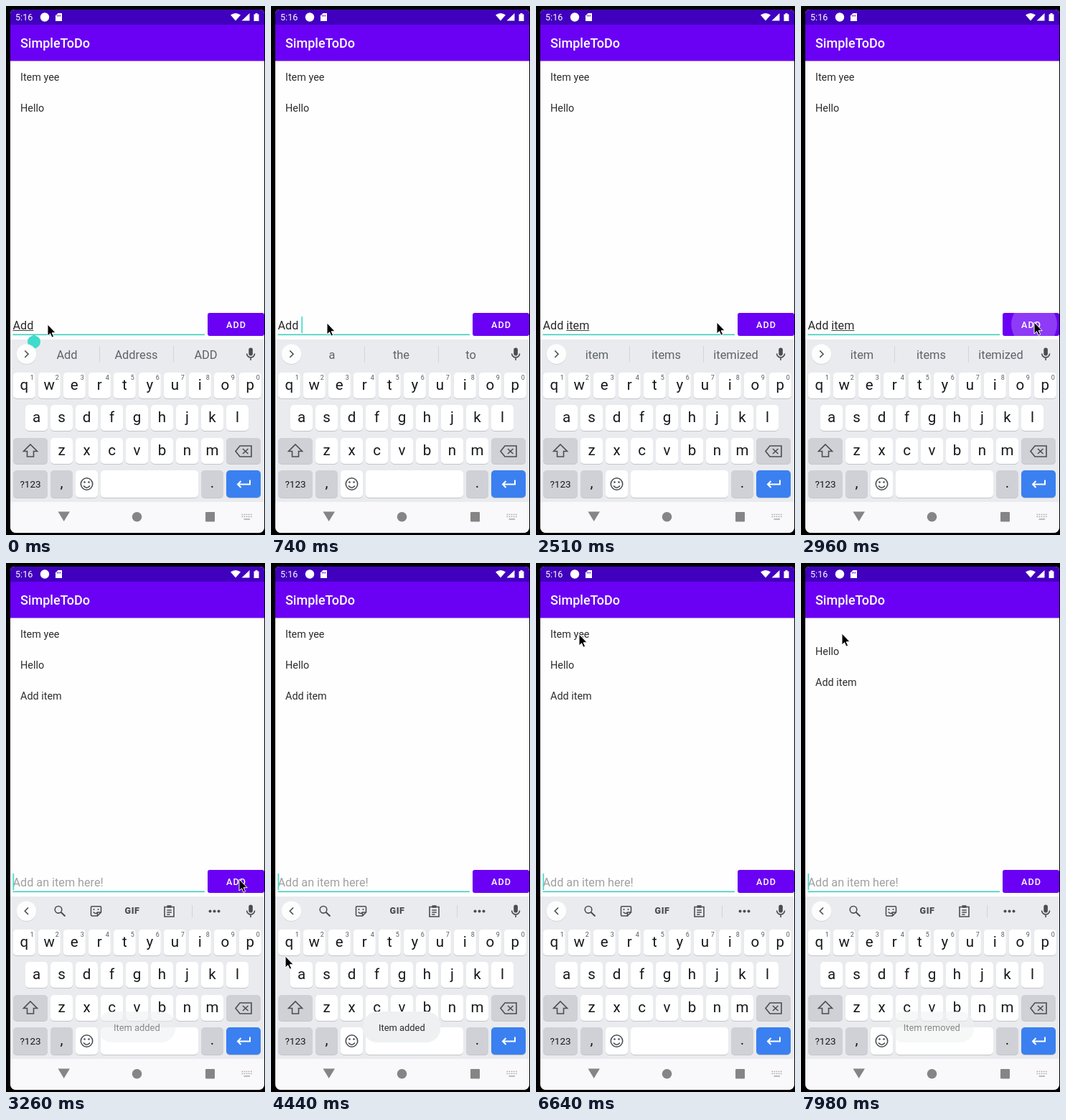
These frames come from a looping animation (361 px wide and 736 px high, 8 s). An HTML page:

```html
<!DOCTYPE html>
<html lang="en">
<head>
<meta charset="utf-8">
<title>To-do list</title>
<style>
  html, body { margin: 0; width: 100%; height: 100%; overflow: hidden; background: #000; }
  svg { display: block; font-family: Roboto, sans-serif; }
  text { white-space: pre; }
  .mid { text-anchor: middle; }
  .line { fill: none; stroke: #4a4d51; stroke-width: 1.6; }
  .item { font-size: 14.4px; fill: #2c2c2c; }
  .input { font-size: 16.2px; }
  .word { font-size: 16.4px; fill: #5f6368; }
</style>
</head>
<body>
<svg width="361" height="736" viewBox="0 0 361 736">
  <defs>
    <clipPath id="screen"><path d="M6 11q0-6 6-6H354q6 0 6 6V724q0 9-9 9H15q-9 0-9-9Z"/></clipPath>
    <clipPath id="button"><rect x="281" y="427" width="79" height="32" rx="3"/></clipPath>
  </defs>
  <g clip-path="url(#screen)">
    <rect width="361" height="736" fill="#fefefe"/>
    <rect width="361" height="26" fill="#4000bd"/>
    <rect y="26" width="361" height="50.5" fill="#6a00f4"/>
    <rect y="464" width="361" height="226" fill="#e9ebee"/>
    <rect y="690" width="361" height="46" fill="#f9f9fb"/>

    <g fill="#fff">
      <text x="13" y="20" font-size="12.6">5:16</text>
      <circle cx="54" cy="15.5" r="6.2"/>
      <path d="M72.5 10H78V21H69V13.5Z"/>
      <path d="M313 12.5Q320 7.5 327 12.5L320 20.5Z"/>
      <path d="M339.5 10V20.5H328.5Z"/>
      <path d="M345.5 11.5H347.5V10H350.5V11.5H352.5V21H345.5Z"/>
      <text x="20" y="58" font-size="18" font-weight="500">SimpleToDo</text>
    </g>
    <path d="M71.5 12.5V14.5M73.5 12.5V14.5M75.5 12.5V14.5" stroke="#4000bd"/>

    <text id="first" class="item" x="20" y="103.7">Item yee</text>
    <g id="rest">
      <text class="item" x="20" y="147">Hello</text>
      <text id="added" class="item" x="20" y="190.3">Add item</text>
    </g>

    <text id="input" class="input" x="9.5" y="450"></text>
    <rect id="composing" y="451" height="1" fill="#444"/>
    <rect x="9.5" y="456.5" width="267.5" height="1.6" fill="#3ecfbd"/>
    <rect id="caret" y="432" width="1.7" height="23" fill="#45dcc8"/>
    <path id="handle" d="M39 457.5L45.2 460.7A9 9 0 1 1 32.8 460.7Z" fill="#40dccb"/>

    <g clip-path="url(#button)">
      <rect x="281" y="427" width="79" height="32" fill="#6a00f4"/>
      <circle id="ripple" cx="325" cy="443" fill="#fff" opacity=".23"/>
    </g>
    <text class="mid" x="321" y="448" font-size="12.6" font-weight="500" letter-spacing="1.13" fill="#fff">ADD</text>

    <circle cx="28.5" cy="485" r="14" fill="#d4d6d9"/>
    <circle cx="28.5" cy="484.3" r="13.8" fill="#fdfdfd"/>
    <path id="chevron" class="line"/>
    <g id="words">
      <text class="word mid" x="85" y="490.5"></text>
      <text class="word mid" x="181.5" y="490.5"></text>
      <text class="word mid" x="278.5" y="490.5"></text>
      <path d="M130.5 473V496M233.5 473V496" stroke="#d2d4d8"/>
    </g>
    <g id="tools">
      <g class="line">
        <circle cx="73" cy="482.3" r="4.8"/><path d="M76.5 485.8L82.5 491.5" stroke-width="2"/>
        <path d="M120 477.8H131Q132.5 477.8 132.5 479.3V486L127.5 491H120Q118.5 491 118.5 489.5V479.3Q118.5 477.8 120 477.8ZM132.5 486H127.5V491M121.8 485.5Q124.5 489 127 486.5"/>
        <path d="M122.5 481V483M128.5 481V483"/>
        <path d="M221 478.5H234V492H221ZM224.3 483H230.8M224.3 486H230.8M224.3 489H228.5"/>
        <path d="M224.5 478H230.5" stroke-width="3.5"/>
      </g>
      <text class="mid" x="176" y="488.3" font-size="12.5" font-weight="900" letter-spacing=".6" fill="#4a4d51">GIF</text>
      <path d="M259.5 476V493" stroke="#d2d4d8"/>
      <g fill="#4a4d51"><circle cx="284.5" cy="484.5" r="2"/><circle cx="290.5" cy="484.5" r="2"/><circle cx="296.5" cy="484.5" r="2"/></g>
    </g>
    <rect x="338.3" y="475.5" width="5.6" height="11" rx="2.8" fill="#4a4d51"/>
    <path class="line" d="M335.6 483.5A5.5 5.5 0 0 0 346.6 483.5M341.1 489V493"/>

    <g id="keys"></g>
    <g class="line">
      <path d="M34 610L43.5 619.5H38.5V627H29.5V619.5H24.5Z"/>
      <path d="M320 619.5L326 612H342V627H326ZM330 616L337.5 623M337.5 616L330 623"/>
      <circle cx="112.5" cy="665" r="8.2"/><path d="M108 667.5Q112.5 673 117 667.5"/>
      <path d="M340 659.5V665.5H323M327.5 661L323 665.5L327.5 670" stroke="#fff" stroke-width="2"/>
    </g>
    <circle cx="109.5" cy="662.5" r="1.3" fill="#4a4d51"/><circle cx="115.5" cy="662.5" r="1.3" fill="#4a4d51"/>

    <g fill="#858585">
      <path d="M72.5 703.5H89L80.7 717Z"/>
      <circle cx="182.5" cy="710.8" r="6.8"/>
      <rect x="278" y="704" width="13" height="13.5" rx="1"/>
    </g>
    <path d="M328.5 707.5H343M328.5 710.5H343" stroke="#aaa" stroke-width="1.6" stroke-dasharray="1.7 1.4"/>
    <path d="M331.5 714H340" stroke="#aaa" stroke-width="1.6"/>

    <g id="toast">
      <rect y="624" height="43" rx="20" fill="#eef0f1"/>
      <text class="mid" x="182.3" y="650.5" font-size="12.9" fill="#2b2b2b"></text>
    </g>
  </g>
  <path id="pointer" d="M0 0V16L3.6 12.7L6 18.2L8.6 17L6.2 11.7H11.2Z" fill="#000" stroke="#fff" stroke-width="1"/>
</svg>
<script>
const LOOP = 8000;
const $ = id => document.getElementById(id);

// Keyboard
const key = (x, y, w, label = '', { fill = '#fff', size = 20.5, hint = '' } = {}) => {
  const h = y > 640 ? 38 : 36, mid = x + w / 2;
  return `<rect x="${x}" y="${y + 1}" width="${w}" height="${h}" rx="5" fill="#c3c5ca"/>
    <rect x="${x}" y="${y}" width="${w}" height="${h}" rx="5" fill="${fill}"/>
    <text class="mid" x="${mid}" y="${y + 24}" font-size="${size}" fill="#17181a">${label}</text>
    <text class="mid" x="${mid + 11}" y="${y + 10}" font-size="9" fill="#55585c">${hint}</text>`;
};
const row = (letters, x, y, hints = '') =>
  [...letters].map((c, i) => key(x + i * 35, y, 31, c, { hint: hints[i] })).join('');
const dark = { fill: '#cfd1d7' };
$('keys').innerHTML =
  row('qwertyuiop', 9.8, 510, '1234567890') + row('asdfghjkl', 27, 555) + row('zxcvbnm', 62, 601) +
  key(10, 601, 48, '', dark) + key(307, 601, 48, '', dark) +
  key(10, 646, 48, '?123', { ...dark, size: 13.5 }) + key(62, 646, 31, ',', dark) +
  key(97, 646, 31) + key(132, 646, 136) + key(272, 646, 31, '.', dark) +
  key(307, 646, 48, '', { fill: '#3b80f0' });

// Each track lists [start, ...values]; values hold until the next start.
const typed = [[0, 'Add'], [440, 'Add '], [1630, 'Add i'], [1780, 'Add ite'], [1920, 'Add item'], [3110, '']];
const words = [
  [0, 'Add', 'Address', 'ADD'], [590, 'a', 'the', 'to'], [1780, 'I', 'in', "I'm"],
  [1920, 'ite', 'item', "it's"], [2070, 'item', 'items', 'itemized']
];
const caretToggles = [150, 1180, 1630, 2510, 3110, 4000, 4440, 5020, 5590, 6040, 6640, 7090, 7540];
const pointer = [
  [0, 58, 443], [150, 78, 441], [2220, 112, 440], [2370, 176, 441], [2510, 252, 440], [2660, 311, 439],
  [2810, 325, 440], [3550, 270, 412], [3700, 130, 372], [3850, 38, 346], [4000, 35, 331],
  [4440, 20, 547], [4590, 62, 690], [4730, 150, 724], [4880, 244, 640], [5020, 200, 450],
  [5170, 130, 290], [5310, 76, 150], [5450, 59, 101], [5590, 60, 99], [7090, 59, 97], [7240, 57, 98]
];
const ripple = [[0, 0], [2810, 14], [2960, 32], [3110, 0]];
const toast = [
  [0, 0, 'Item added', 108], [3260, .55, 'Item added', 108], [3400, 1, 'Item added', 108],
  [5170, .5, 'Item added', 108], [5310, 0, 'Item added', 108],
  [7830, .1, 'Item removed', 118], [7980, .55, 'Item removed', 118]
];
const firstOpacity = [[0, 1], [7830, .3], [7980, 0]];
const listShift = [[0, 0], [7980, -19.5]];

const at = (track, t) => track.findLast(step => step[0] <= t).slice(1);
const set = (el, attrs) => { for (const name in attrs) el.setAttribute(name, attrs[name]); };
const show = (el, visible) => set(el, { visibility: visible ? 'visible' : 'hidden' });

const ruler = document.createElement('canvas').getContext('2d');
const widthOf = text => {
  ruler.font = '16.2px Roboto, sans-serif';
  return ruler.measureText(text).width;
};

function draw(t) {
  const [text] = at(typed, t);
  const input = $('input');
  input.textContent = text || 'Add an item here!';
  set(input, { fill: text ? '#2a2a2a' : '#a0a0a0' });

  const end = 9.5 + widthOf(text);
  const start = text === 'Add' ? 9.5 : 9.5 + widthOf('Add ');
  set($('composing'), { x: start, width: Math.max(0, end - start) });
  set($('caret'), { x: end });
  show($('caret'), caretToggles.filter(time => time <= t).length % 2);
  show($('handle'), t < 440);

  const suggesting = t < 3110;
  show($('words'), suggesting);
  show($('tools'), !suggesting);
  set($('chevron'), { d: suggesting ? 'M26.3 479.5L31 484.3L26.3 489' : 'M31 479.5L26.3 484.3L31 489' });
  at(words, t).forEach((word, i) => { $('words').children[i].textContent = word; });

  show($('added'), t >= 3110);
  set($('first'), { opacity: at(firstOpacity, t)[0] });
  set($('rest'), { transform: `translate(0 ${at(listShift, t)[0]})` });
  set($('ripple'), { r: at(ripple, t)[0] });

  const [opacity, message, width] = at(toast, t);
  const [box, label] = $('toast').children;
  set($('toast'), { opacity });
  set(box, { x: 182.3 - width / 2, width });
  label.textContent = message;

  set($('pointer'), { transform: `translate(${at(pointer, t).join(' ')})` });
}

function frame() {
  draw(performance.now() % LOOP);
  requestAnimationFrame(frame);
}
frame();
</script>
</body>
</html>
```
